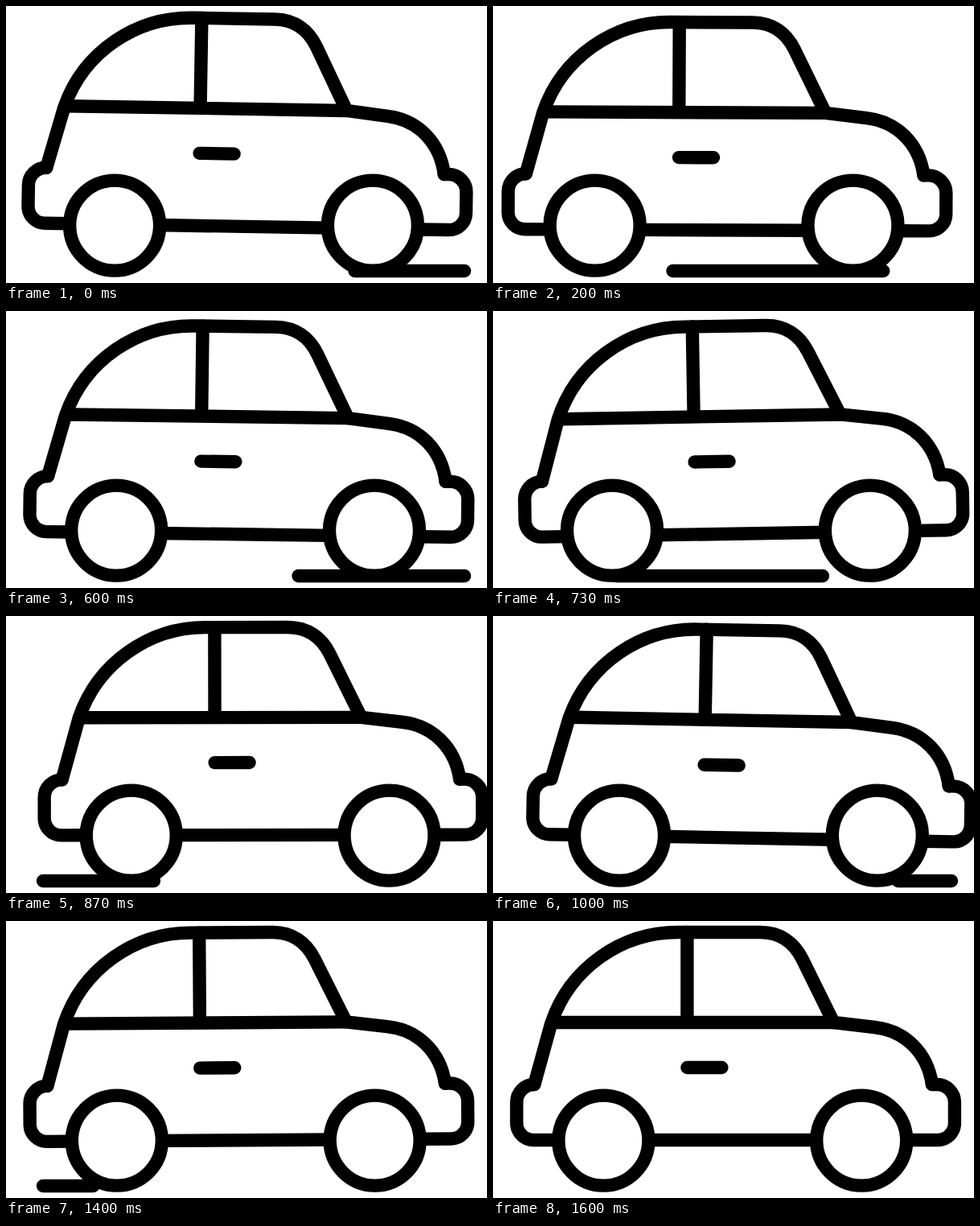
Recreate the animation shown at these times as an HTML page. Size 598x344 px, loop 1670 ms.

```html
<!DOCTYPE html>
<html lang="en">
<head>
<meta charset="utf-8">
<title>Driving car</title>
<style>
  html, body { margin: 0; width: 100%; height: 100%; overflow: hidden; background: #fff; }
  svg { display: block; width: 100vw; height: 100vh; }
</style>
</head>
<body>
<svg viewBox="0 0 598 344" fill="none" stroke="#000" stroke-width="16.4" stroke-linecap="round" stroke-linejoin="round">
  <path id="road"/>
  <g id="car">
    <g id="body">
      <path d="M51 203L72 127A166 166 0 0 1 232 14H332C357 14 374 27 384 47L423 126L474 132C512 136 540 164 545.5 203"/>
      <path d="M76 126H423M241 14V126"/>
      <path d="M51 203A22 22 0 0 0 29 225V251A21 21 0 0 0 50 272H80"/>
      <path d="M545.5 203H551.5A22 22 0 0 1 573.5 225V251A21 21 0 0 1 552.5 272H515"/>
      <path d="M190 272H405M241 182H284"/>
    </g>
    <g fill="#fff">
      <circle cx="137" cy="272.6" r="56"/>
      <circle cx="457.8" cy="272.6" r="56"/>
    </g>
  </g>
</svg>
<script>
  // Time is counted in steps: the car drives for DRIVE of them, then rests
  const LOOP = 1670, STEP = 200 / 3, LAST = 24, DRIVE = 22, LEAD = 0.3;
  const [road, car, body] = ['road', 'car', 'body'].map(id => document.getElementById(id));

  const clamp = (v, lo, hi) => Math.min(hi, Math.max(lo, v));
  const ramp = (t, from, to) => (1 - Math.cos(Math.PI * clamp((t - from) / (to - from), 0, 1))) / 2;

  // Falls back, overtakes, returns
  function sway(t) {
    const back = 5, ahead = DRIVE * 2 / 3;
    return 0.4 - 14.5 * ramp(t, 0, back) + 34.5 * ramp(t, back, ahead) - 20 * ramp(t, ahead, DRIVE);
  }

  // Three rocking turns, quicker in the middle
  function rock(t) {
    const p = clamp(t / DRIVE, 0, 1);
    return 6 * Math.PI * p + 1.2 * Math.sin(Math.PI * p * p);
  }

  // Three strokes pass below the car
  function roadPath(t) {
    const gap = DRIVE / 3;
    const u = t - gap * Math.min(2, Math.floor(t / gap));
    const left = clamp(570 - 105 * u, 46, 570);
    const right = clamp(570 - 113 * (u - 2.55), 46, 570);
    return right > left ? `M${left} 329H${right}` : '';
  }

  function draw(ms) {
    const t = clamp(Math.floor((ms % LOOP + 3.5) / STEP), 1, LAST) + LEAD;
    const phase = rock(t);
    const lift = 3.2 * (1 - Math.cos(phase));
    const tilt = 1.05 * Math.sin(phase);
    road.setAttribute('d', roadPath(t));
    car.setAttribute('transform', `translate(${sway(t)} 0)`);
    body.setAttribute('transform', `translate(0 ${lift}) rotate(${tilt} 297 272)`);
  }

  const start = performance.now();
  function tick() {
    draw(performance.now() - start);
    requestAnimationFrame(tick);
  }
  tick();
</script>
</body>
</html>
```
